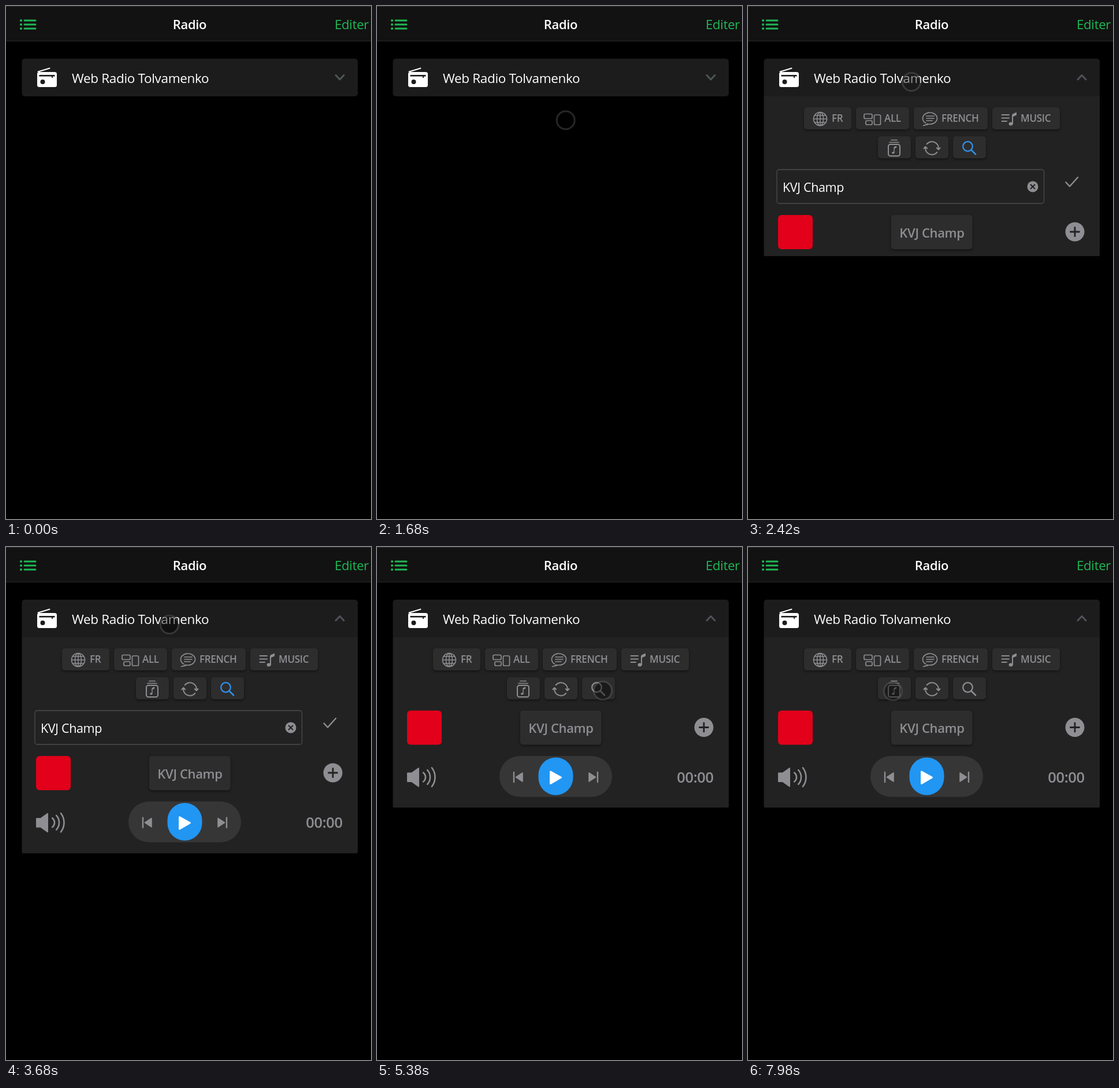
Write an HTML page with a canvas that moves like this. It is 632 px wide and 886 px high and loops after 8 s.

```html
<!DOCTYPE html>
<html lang="fr">
<head>
<meta charset="utf-8">
<title>Radio</title>
<style>
html, body { margin: 0; width: 100%; height: 100%; overflow: hidden; background: #000; }
canvas { display: block; }
</style>
</head>
<body>
<canvas id="stage" width="632" height="886"></canvas>
<script>
const ctx = document.getElementById('stage').getContext('2d');
const LOOP = 8000;
const GREY = '#8e8e93', GREEN = '#1fb955', BLUE = '#2196f3', CHIP = '#2d2d2d', PANEL = '#222222', CARD = '#1c1c1c';
const FONT = '"Open Sans", "Noto Sans", sans-serif';

// Pointer moves: start, end, steps, then start, bend and end points.
const MOVES = [
  [570, 1310, 12, 508, 880, 470, 570, 353, 230],
  [1400, 2110, 9, 353, 230, 318, 190, 283, 131],
  [3680, 4420, 12, 283, 134, 318, 215, 400, 257],
  [4580, 4630, 2, 400, 257, 397, 252, 394, 248],
  [5380, 5381, 2, 391, 248, 391, 248, 391, 248],
  [7470, 7980, 9, 391, 248, 320, 264, 251, 249]
];
const OPEN_STEPS = [2210, 2620, 7];
const OPEN_AT = 2286;
const SEARCH_OFF = 4970;

// Fraction of a stepped interval, held between steps.
function stepped(t, [start, end, n]) {
  const k = Math.floor((t - start) / (end - start) * (n - 1) + 0.001);
  return Math.max(0, Math.min(1, k / (n - 1)));
}

function paint(fill, stroke, lw) {
  if (fill) { ctx.fillStyle = fill; ctx.fill(); }
  if (stroke) { ctx.strokeStyle = stroke; ctx.lineWidth = lw; ctx.stroke(); }
}

function box(x, y, w, h, r, fill, stroke, lw = 2) {
  ctx.beginPath();
  ctx.roundRect(x, y, w, h, r);
  paint(fill, stroke, lw);
}

function trace(points) {
  ctx.beginPath();
  points.forEach(([x, y], i) => i ? ctx.lineTo(x, y) : ctx.moveTo(x, y));
}

function line(points, color, lw) {
  trace(points);
  paint(null, color, lw);
}

function poly(points, fill, stroke, lw) {
  trace(points);
  ctx.closePath();
  paint(fill, stroke, lw);
}

function oval(x, y, rx, ry, fill, stroke, lw) {
  ctx.beginPath();
  ctx.ellipse(x, y, rx, ry, 0, 0, Math.PI * 2);
  paint(fill, stroke, lw);
}

function arc(x, y, r, from, to, color, lw) {
  ctx.beginPath();
  ctx.arc(x, y, r, from, to);
  paint(null, color, lw);
}

function label(text, x, y, size, color, weight = 400, align = 'left') {
  ctx.font = `${weight} ${size}px ${FONT}`;
  ctx.letterSpacing = '-0.35px';
  ctx.textAlign = align;
  ctx.fillStyle = color;
  ctx.fillText(text, x, y);
}

function raised(x, y, w, h) {
  ctx.save();
  ctx.shadowColor = 'rgba(0,0,0,.45)';
  ctx.shadowBlur = 4;
  ctx.shadowOffsetY = 2;
  box(x, y, w, h, 5, CHIP);
  ctx.restore();
}

function topBar() {
  ctx.fillStyle = '#121212';
  ctx.fillRect(0, 0, 632, 61);
  ctx.fillStyle = '#303030';
  ctx.fillRect(0, 0, 632, 1);
  ctx.fillStyle = '#292929';
  ctx.fillRect(0, 60, 632, 1);
  for (const y of [25, 32, 39]) {
    oval(26, y, 2.1, 2.1, GREEN);
    line([[32, y], [51, y]], GREEN, 3);
  }
  label('Radio', 318, 40, 22, '#fff', 600, 'center');
  label('Editer', 569, 40, 22.3, GREEN);
}

function header(t) {
  const open = t >= 2110;
  box(27.5, 91, 581.5, 65, t > OPEN_AT ? [5, 5, 0, 0] : 5, CARD);
  line([[55.5, 113.5], [75.5, 107.5]], '#fff', 2);
  box(54, 114, 34, 26, 3.5, '#fff');
  ctx.fillStyle = CARD;
  ctx.fillRect(57.5, 119, 27, 2.6);
  ctx.fillRect(79, 121, 2, 3);
  oval(63.5, 131, 4, 4, CARD);
  label('Web Radio Tolvamenko', 114, 132.5, 22.5, '#fff');
  const tip = open ? 119.5 : 127, ends = open ? 127 : 119.5;
  const tone = !open ? '#4d5755' : t < 2350 ? '#626262' : '#51515a';
  line([[571, ends], [578, tip], [585, ends]], tone, 3);
}

function note(x, y, s) {
  oval(x - 3 * s, y, 3.4 * s, 3 * s, GREY);
  line([[x, y], [x, y - 15 * s]], GREY, 1.5 * s + 0.5);
  poly([[x, y - 17 * s], [x + 7 * s, y - 20 * s], [x + 7 * s, y - 15 * s], [x, y - 12 * s]], GREY);
}

function filters() {
  for (const [x, w, text, tx] of [[97, 82, 'FR', 145], [187, 92, 'ALL', 236], [287, 128, 'FRENCH', 335], [423, 117, 'MUSIC', 472]]) {
    raised(x, 175, w, 38);
    label(text, tx, 199.5, 17.1, GREY, 600);
  }
  // globe
  oval(125, 195, 11.5, 11.5, null, GREY, 1.6);
  oval(125, 195, 5.5, 11.5, null, GREY, 1.5);
  line([[125, 183.5], [125, 206.5]], GREY, 1.5);
  line([[113.5, 195], [136.5, 195]], GREY, 1.5);
  line([[116, 189], [134, 189]], GREY, 1.3);
  line([[116, 201], [134, 201]], GREY, 1.3);
  // tiles
  box(201, 186.5, 14, 8, 2, null, GREY, 1.7);
  box(204, 198, 11, 7, 2, null, GREY, 1.7);
  box(218.5, 188, 11, 17, 2, null, GREY, 1.7);
  // speech bubble
  ctx.beginPath();
  ctx.ellipse(315, 194, 12.5, 10, 0, 2.2, 2.2 + 5.75);
  ctx.lineTo(303.5, 206.5);
  ctx.quadraticCurveTo(308, 206, 311, 203.5);
  paint(null, GREY, 1.7);
  for (const [y, end] of [[190, 322], [194, 322], [198, 319]]) line([[309, y], [end, y]], GREY, 1.7);
  // playlist
  for (const [y, end] of [[188, 452], [193.5, 452], [199, 448]]) line([[439.5, y], [end, y]], GREY, 1.8);
  note(458, 203.5, 1);
}

function tools(searching) {
  for (const x of [225, 290, 355]) raised(x, 225, 57, 38);
  // albums
  box(243, 239, 20, 20, 3.5, null, GREY, 2);
  line([[245, 235.5], [261, 235.5]], GREY, 1.7);
  line([[248, 231.5], [258, 231.5]], GREY, 1.7);
  note(253, 253.5, 0.6);
  // refresh
  const deg = Math.PI / 180;
  arc(318.5, 245.5, 11.3, 219 * deg, 369 * deg, GREY, 2);
  arc(318.5, 245.5, 11.3, 39 * deg, 189 * deg, GREY, 2);
  line([[304.5, 246], [307.3, 243], [310.2, 246]], GREY, 2);
  line([[326.8, 245], [329.7, 248], [332.5, 245]], GREY, 2);
  // search
  const tone = searching ? '#2f92ee' : GREY;
  oval(380.5, 242.5, 8.3, 8.3, null, tone, 2.2);
  line([[386.5, 248.5], [394, 256]], tone, 2.5);
}

function searchField() {
  box(50, 282.5, 462.5, 58.5, 4, PANEL, '#4b4b4b', 1.3);
  label('KVJ Champ', 60, 321, 21.5, '#fff');
  oval(493, 312, 9.5, 9.5, GREY);
  line([[489.5, 308.5], [496.5, 315.5]], PANEL, 2);
  line([[496.5, 308.5], [489.5, 315.5]], PANEL, 2);
  line([[550.5, 304.5], [557, 311.5], [571, 296]], GREY, 2.4);
}

function station() {
  box(52, 361, 60, 59, 6, '#e2001a');
  raised(248, 361, 140.5, 59);
  label('KVJ Champ', 318.5, 399.5, 22, GREY, 600, 'center');
  oval(566, 390, 16.5, 16.5, GREY);
  line([[558.5, 390], [573.5, 390]], PANEL, 2.8);
  line([[566, 382.5], [566, 397.5]], PANEL, 2.8);
}

function player() {
  poly([[53, 469], [60, 469], [72, 460.5], [72, 492], [60, 483.5], [53, 483.5]], GREY, GREY, 2);
  for (const [r, a] of [[10, 0.9], [18, 0.75], [26.5, 0.66]]) arc(74, 476, r, -a, a, GREY, 2.6);
  box(212, 439.5, 195, 70.5, 35.25, '#363636');
  box(279.5, 442, 60, 65, 30, BLUE);
  poly([[300.5, 466.5], [318.5, 476.5], [300.5, 487]], '#fff', '#fff', 3);
  for (const side of [-1, 1]) {
    const at = d => 309.5 + side * d;
    line([[at(72.5), 467.5], [at(72.5), 484.5]], GREY, 2.4);
    poly([[at(57.5), 468.5], [at(69), 476], [at(57.5), 483.5]], GREY, GREY, 1.6);
  }
  label('00:00', 551, 485, 25.5, GREY, 600, 'center');
}

function panel(t) {
  const p = Math.max(0, (2210 + 410 * stepped(t, OPEN_STEPS) - OPEN_AT) / 300);
  const grown = 1 - Math.pow(1 - Math.min(1, p), 2.4);
  if (!grown) return;
  const searching = t < SEARCH_OFF;
  const height = searching ? Math.floor(373 * grown) : 294;
  ctx.save();
  box(27.5, 156, 581.5, height, [0, 0, 2, 2], PANEL);
  ctx.clip();
  filters();
  tools(searching);
  if (searching) searchField();
  else ctx.translate(0, -78.5);
  station();
  player();
  ctx.restore();
}

function pointer(t) {
  const move = MOVES.findLast(m => t >= m[0]);
  if (!move) return;
  const [, , , x0, y0, cx, cy, x1, y1] = move;
  const u = stepped(t, move), v = 1 - u;
  const x = v * v * x0 + 2 * u * v * cx + u * u * x1;
  const y = v * v * y0 + 2 * u * v * cy + u * u * y1;
  const pressed = t >= 2110 && t < 3680;
  oval(x, y, 15.5, 15.5, pressed ? 'rgba(25,25,25,.45)' : 'rgba(0,0,0,.42)', 'rgba(128,128,128,.3)', 3);
}

function draw() {
  const t = performance.now() % LOOP;
  ctx.fillStyle = '#000';
  ctx.fillRect(0, 0, 632, 886);
  ctx.lineCap = ctx.lineJoin = 'round';
  topBar();
  header(t);
  panel(t);
  pointer(t);
  requestAnimationFrame(draw);
}
draw();
</script>
</body>
</html>
```
